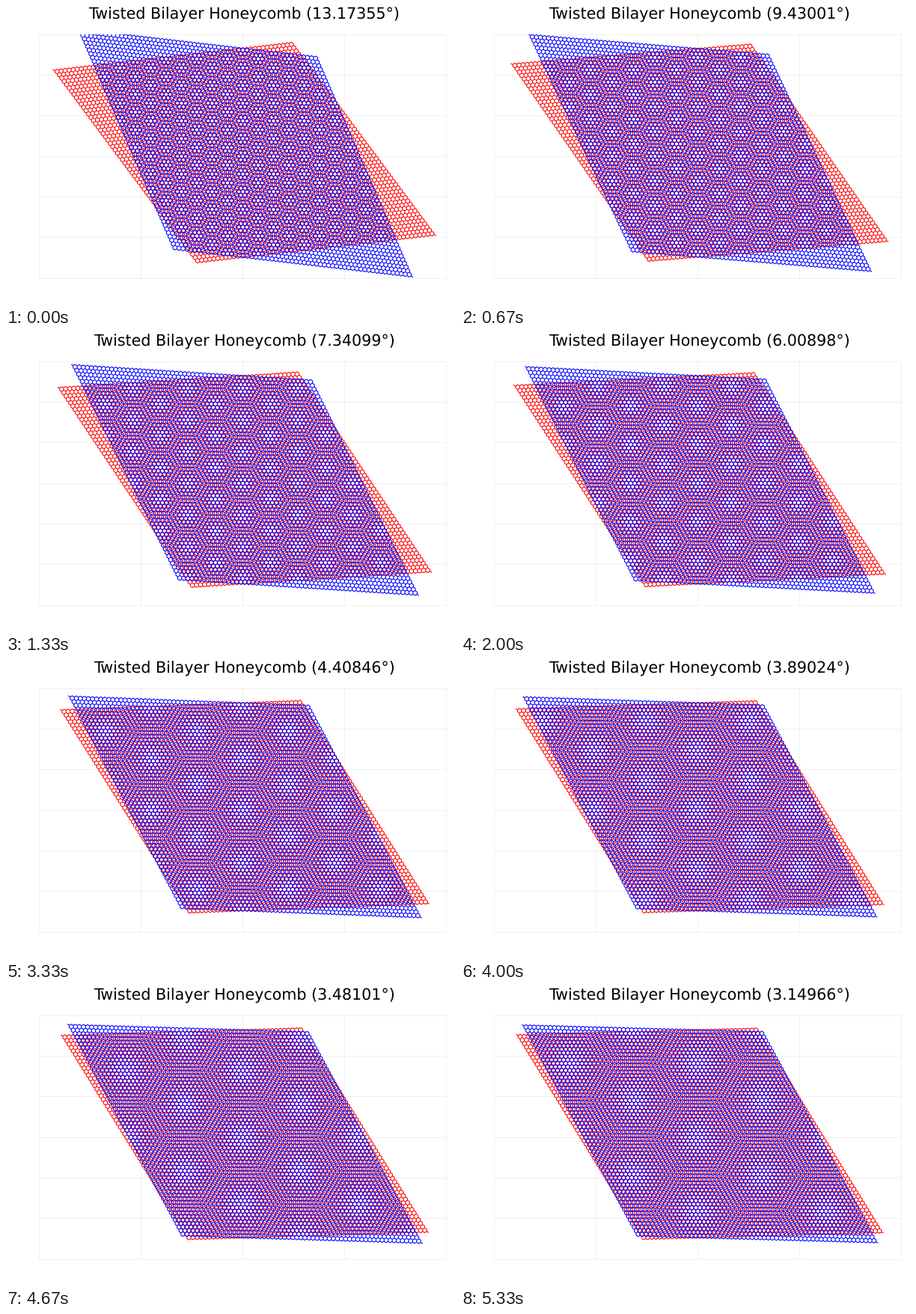
Write a matplotlib script that moves like this. It is 600 px wide and 400 px high and loops after 6 s.

```python
import numpy as np
import matplotlib.pyplot as plt
from matplotlib.animation import FuncAnimation
from matplotlib.collections import LineCollection
from matplotlib.transforms import Affine2D

plt.rcParams["text.hinting"] = "none"

W, H, DPI = 600, 400, 100
PX = 72 / DPI             # points per pixel
FRAMES, STEP = 120, 50    # one loop of 6000 ms
ORDERS = range(2, 11)     # commensurate twist orders
CELLS = np.arange(-29, 31)
UNIT = 326 / 60           # pixels per lattice constant
CX, CY = 316.5, 201.1     # rotation centre, from the top left

A1 = np.array([1, 0])
A2 = np.array([-0.5, np.sqrt(3) / 2])


def honeycomb():
    """Rhombic honeycomb patch: zigzag chains and the bonds between them."""
    i, j = np.meshgrid(CELLS, CELLS)
    base = i[..., None] * A1 + j[..., None] * A2
    a = base + (2 * A1 + A2) / 3
    b = base + (A1 + 2 * A2) / 3
    chains = np.stack([b, a], axis=2).reshape(len(CELLS), -1, 2)
    links = np.stack([a[1:], b[:-1]], axis=2).reshape(-1, 2, 2)
    return [*chains, *links]


def twist(m):
    n = 3 * m * m + 3 * m
    return np.arccos((n + 0.5) / (n + 1))


fig = plt.figure(figsize=(W / DPI, H / DPI), dpi=DPI, facecolor="white")
ax = fig.add_axes([(CX - 50 * UNIT) / W, 1 - (CY + 30 * UNIT) / H,
                   100 * UNIT / W, 60 * UNIT / H])
ax.set(xlim=(-50, 50), ylim=(-30, 30))
ax.axis("off")

# The half-pixel shift makes each grid line snap to the pixel it lies in.
grid = dict(color="#f0f0f0", lw=PX, zorder=0, clip_on=False,
            transform=ax.transData + Affine2D().translate(-0.5, 0.5))
for x in range(-50, 51, 25):
    ax.plot([x, x], [-30, 30], **grid)
for y in range(-30, 31, 10):
    ax.plot([-50, 50], [y, y], **grid)

bonds = honeycomb()
layers = []
for z, (color, sign) in enumerate([("#ff0000", 1), ("#0000ff", -1)], 1):
    layer = LineCollection(bonds, colors=color, linewidths=1.1 * PX, zorder=z)
    ax.add_collection(layer, autolim=False)
    layers.append((layer, sign))

title = fig.text(318 / W, 1 - 18 / H, "", ha="center", va="baseline",
                 family="DejaVu Sans", size=20.65 * PX, color="black")


def draw(i):
    # Nine equal holds, each starting on the tick at or just before its time.
    t = twist(ORDERS[(3 * i + 2) // 40])
    for layer, sign in layers:
        layer.set_transform(Affine2D().rotate(sign * t / 2) + ax.transData)
    angle = round(float(np.degrees(t)), 5)
    title.set_text(f"Twisted Bilayer Honeycomb ({angle}°)")
    return [layer for layer, _ in layers] + [title]


anim = FuncAnimation(fig, draw, frames=FRAMES, interval=STEP,
                     repeat=True, repeat_delay=0)
plt.show()
```
